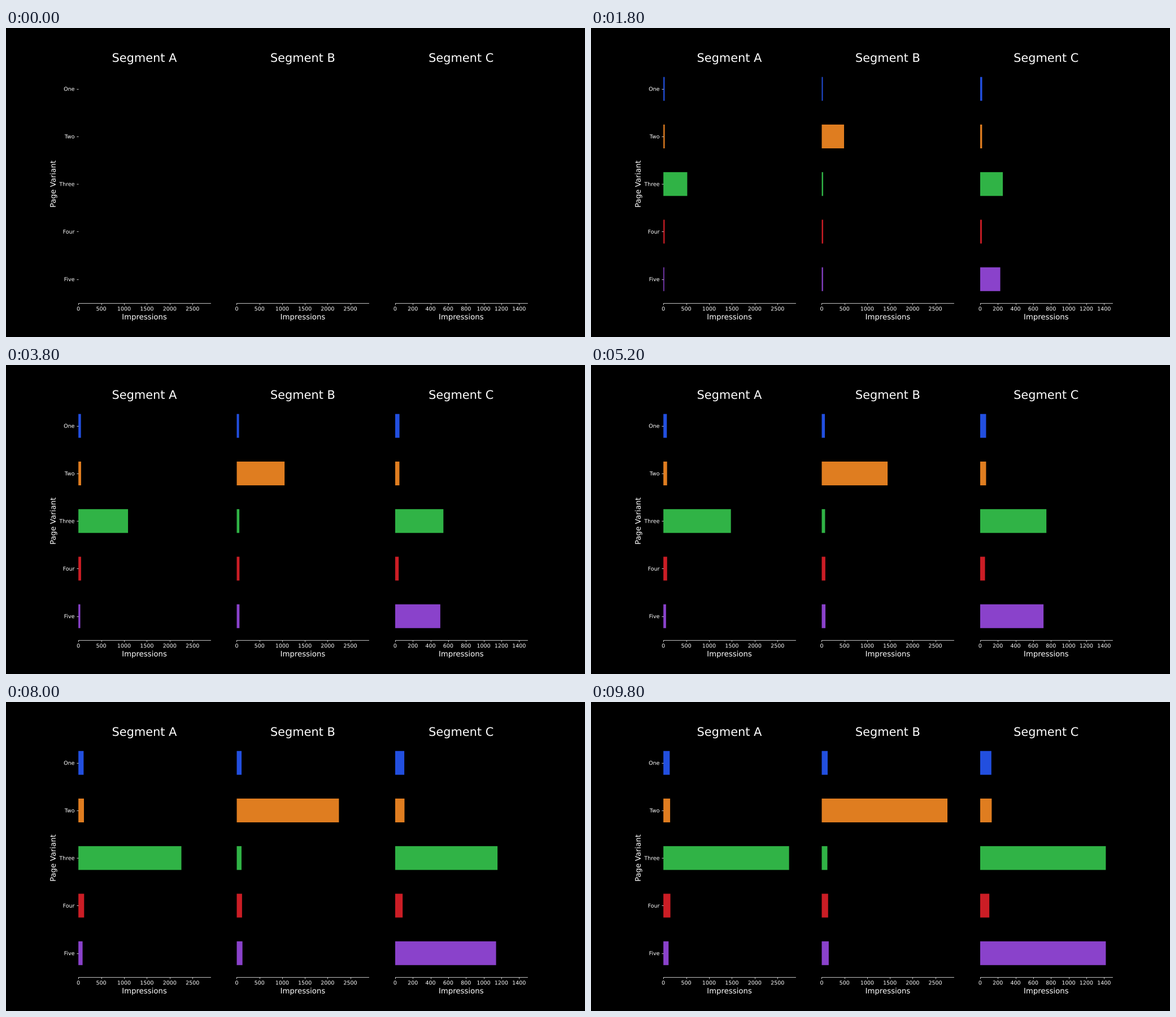
A matplotlib script that plays this animation: 1025x547 px, repeating every 10000 ms.

```python
import colorsys

import matplotlib.pyplot as plt
from matplotlib.animation import FuncAnimation
from matplotlib.colors import to_rgb
from matplotlib.patheffects import Normal
from matplotlib.text import Text

WIDTH, HEIGHT = 1025, 547
DPI = WIDTH / 15
FRAMES, INTERVAL = 50, 200

VARIANTS = ["One", "Two", "Three", "Four", "Five"]
PALETTE = ["#023eff", "#ff7c00", "#1ac938", "#e8000b", "#8b2be2"]

# Per variant: final impressions and growth exponent (1 is steady growth)
SEGMENTS = {
    "Segment A": [(139, 0.95), (148, 0.95), (2752, 0.98), (154, 1), (114, 1.05)],
    "Segment B": [(130, 1), (2767, 1.02), (124, 0.82), (140, 0.9), (154, 1)],
    "Segment C": [(127, 1), (131, 1.05), (1420, 1.01), (104, 1), (1420, 1.08)],
}


def desaturate(color, amount=0.75):
    hue, light, sat = colorsys.rgb_to_hls(*to_rgb(color))
    return colorsys.hls_to_rgb(hue, light, sat * amount)


def impressions(total, power, step):
    return total * (step / (FRAMES - 1)) ** power


def setup_axis(ax, title, top, first):
    ax.set_title(title, fontsize=22)
    ax.set_xlabel("Impressions", fontsize=14)
    ax.set_xlim(0, top * 1.05)
    ax.set_ylim(len(VARIANTS) - 0.5, -0.5)
    ax.spines[["left", "right", "top"]].set_visible(False)
    if first:
        ax.set_yticks(range(len(VARIANTS)), VARIANTS)
        ax.set_ylabel("Page Variant", fontsize=14)
    else:
        ax.set_yticks([])


plt.style.use("dark_background")
plt.rcParams.update({"font.family": "DejaVu Sans", "text.hinting": "none"})

# The tiny margin keeps the pixel size from rounding down
size = ((WIDTH + 1e-6) / DPI, (HEIGHT + 1e-6) / DPI)
fig, axes = plt.subplots(1, 3, figsize=size, dpi=DPI)
fig.set_facecolor("black")

colors = [desaturate(c) for c in PALETTE]
bars = []
for i, (ax, (title, growth)) in enumerate(zip(axes, SEGMENTS.items())):
    rects = ax.barh(range(len(VARIANTS)), [0] * len(VARIANTS),
                    height=0.5, color=colors, linewidth=0, snap=False)
    setup_axis(ax, title, max(total for total, _ in growth), i == 0)
    bars += zip(rects, growth)

# Outlined text keeps its sub-pixel position
for text in fig.findobj(Text):
    text.set_path_effects([Normal()])


def update(step):
    for rect, (total, power) in bars:
        rect.set_width(impressions(total, power, step))
        rect.set_visible(step > 0)
    return [rect for rect, _ in bars]


anim = FuncAnimation(fig, update, frames=FRAMES, interval=INTERVAL,
                     repeat=True, repeat_delay=0, blit=False)
plt.show()
```
